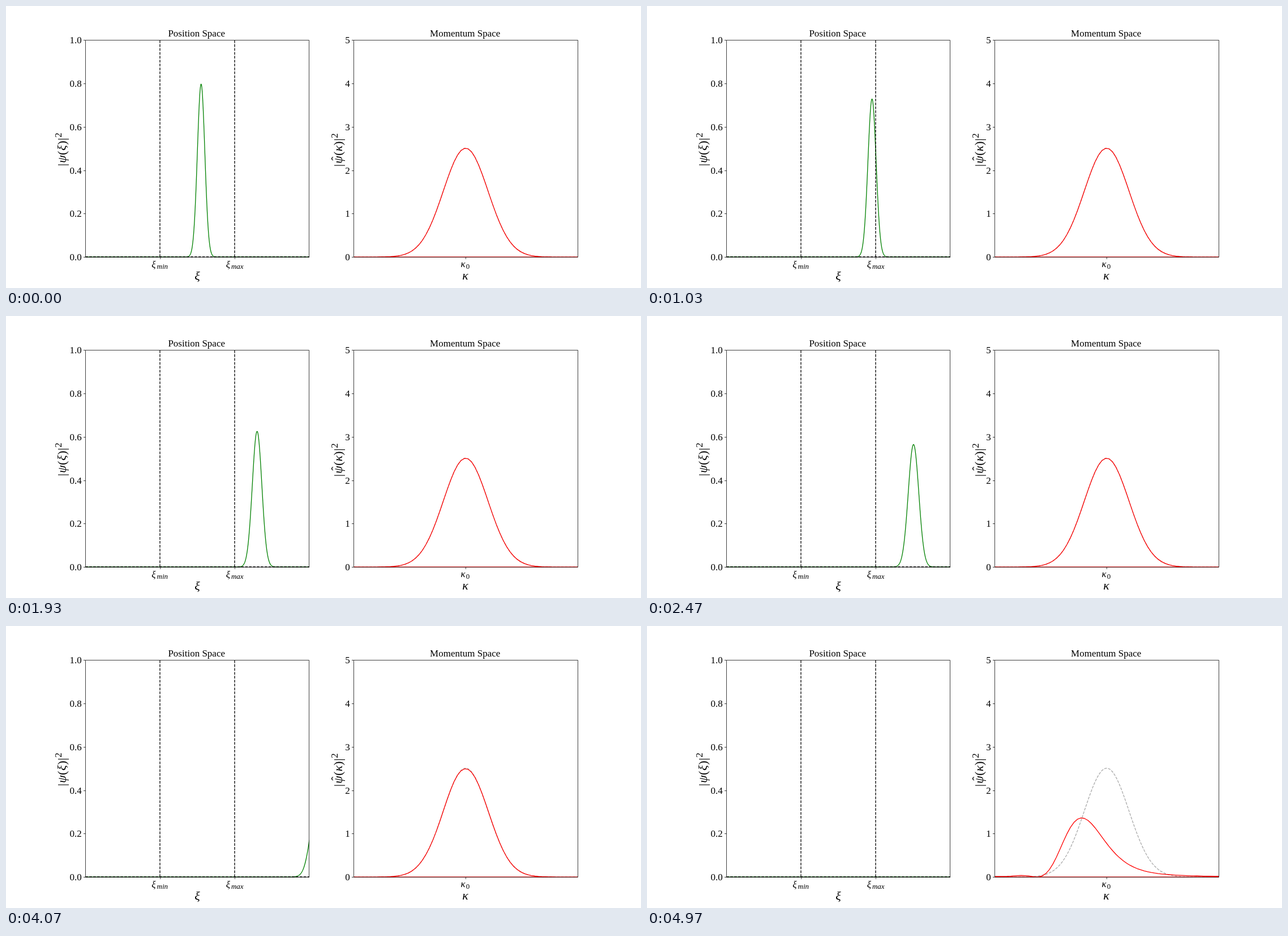
Recreate the animation shown at these times as an HTML page. Size 1122 by 499 pixels, loop 5000 ms.

```html
<!DOCTYPE html>
<html lang="en">
<head>
<meta charset="utf-8">
<title>Wave packet in position and momentum space</title>
<style>
html, body { margin: 0; width: 100%; height: 100%; overflow: hidden; background: #fff; }
svg { display: block; width: 1122px; height: 499px; }
text { font-family: "Liberation Serif", "Noto Serif", serif; font-size: 17px; text-anchor: middle; }
.end { text-anchor: end; }
.it { font-style: italic; }
.big { font-size: 22px; }
.sub { font-size: 13px; }
path { fill: none; stroke-width: 1.3; stroke-linejoin: round; }
.dash { stroke-dasharray: 4.805 2.078; }
.frame { stroke: #000; stroke-width: .75; }
</style>
</head>
<body>
<svg id="stage" viewBox="0 0 1122 499">
  <clipPath id="clipL"><rect x="140.25" y="60" width="395.75" height="385"/></clipPath>
  <clipPath id="clipR"><rect x="614.6" y="60" width="395.5" height="385"/></clipPath>
  <g clip-path="url(#clipL)">
    <path id="pos" stroke="#008000"/>
    <path class="dash" stroke="#000" d="M140.25 444H536M272 444.1V60M404 444.1V60"/>
  </g>
  <g clip-path="url(#clipR)">
    <path id="ref" class="dash" stroke="#a9a9a9"/>
    <path id="mom" stroke="#f00"/>
  </g>
</svg>
<script>
const $ = id => document.getElementById(id);
const BASE = 444.15, HEIGHT = 384.1;
const XI0 = 337.9, XI = 13.175;        // position axis: centre and pixels per unit
const K0 = 812.2, K = 39.525;          // momentum axis: centre and pixels per unit
const EDGE = 19.975;                   // end of the computed domain
const DK = 2 * Math.PI / 40, PHASE = -0.32;

const add = (tag, attrs, content = '') => {
  const el = document.createElementNS('http://www.w3.org/2000/svg', tag);
  for (const a in attrs) el.setAttribute(a, attrs[a]);
  el.textContent = content;
  $('stage').append(el);
};
const label = (x, y, s, cls = '') => add('text', { x, y, class: cls }, s);
const polyline = pts => 'M' + pts.map(p => p[0].toFixed(2) + ' ' + p[1].toFixed(2)).join('L');

// Axes, ticks and labels
function axes(left, right, title, step, digits) {
  let d = `M${left} 60.5H${right}V444.5H${left}Z`;
  for (let v = 0; v <= 5; v++) {
    const y = BASE - v * HEIGHT / 5;
    d += `M${left} ${Math.floor(y + .5) + .5}h-3.5`;
    label(left - 6.7, y + 6, (v * step).toFixed(digits), 'end');
  }
  add('path', { class: 'frame', d });
  label((left + right) / 2 - 1.3, 54.3, title);
}
axes(140.5, 535.5, 'Position Space', .2, 1);
axes(614.5, 1010.5, 'Momentum Space', 1, 0);
add('path', { class: 'frame', d: 'M272.5 444.5v3.5M404.5 444.5v3.5M812.5 444.5v3.5' });

label(261, 463, 'ξ', 'it');
label(276.3, 465.3, 'min', 'it sub');
label(392.5, 463, 'ξ', 'it');
label(408.8, 465.3, 'max', 'it sub');
label(807.5, 462, 'κ', 'it');
label(816, 464.5, '0', 'sub');
label(338, 484.5, 'ξ', 'it big');
label(811.5, 484, 'κ', 'it big');

// Vertical labels, one glyph at a time along the reading direction
function sideLabel(x, bottom, greek, hat) {
  const glyph = (at, s, cls, lift = 0) =>
    add('text', { transform: `translate(${x - lift} ${bottom - at}) rotate(-90)`, class: cls }, s);
  glyph(2, '|', 'big');
  glyph(12, 'ψ', 'it big');
  if (hat) glyph(14, 'ˆ', 'big', 4);
  glyph(23, '(', 'big');
  glyph(32, greek, 'it big');
  glyph(41, ')', 'big');
  glyph(47.5, '|', 'big');
  glyph(54.5, '2', '', 8);
}
sideLabel(106, 283, 'ξ', false);
sideLabel(593.5, 284, 'κ', true);

// Momentum density of the spreading packet, cut off b units past its centre
function spectrum(tau, b) {
  const N = 320, low = -8, h = (Math.min(b, 8) - low) / N, w = 1 + tau * tau;
  const psi = Array.from({ length: N }, (_, i) => {
    const u = low + (i + .5) * h;
    return [u, Math.exp(-u * u / w), u * u * tau / w];
  });
  const norm = Math.sqrt(2 * Math.PI) * h * h / (Math.PI * Math.sqrt(w));
  return q => {
    let re = 0, im = 0;
    for (const [u, a, p] of psi) {
      re += a * Math.cos(p - q * u);
      im += a * Math.sin(p - q * u);
    }
    return norm * (re * re + im * im);
  };
}

const ref = [];
for (let q = -5; q <= 5.001; q += .05)
  ref.push([K0 + q * K, BASE - Math.sqrt(2 * Math.PI) * Math.exp(-q * q / 2) * HEIGHT / 5]);
$('ref').setAttribute('d', polyline(ref));

function draw(step) {
  const n = step + 4, centre = .12945 * n, tau = .0128 * n;
  const spread = 1 + tau * tau, peak = Math.sqrt(2 / Math.PI / spread);

  const pos = [];
  for (let x = 140; x <= 536; x += .5) {
    const u = (x - XI0) / XI - centre;
    pos.push([x, BASE - HEIGHT * peak * Math.exp(-2 * u * u / spread)]);
  }
  $('pos').setAttribute('d', polyline(pos));

  const density = spectrum(tau, EDGE - centre), mom = [];
  for (let m = -33; m <= 34; m++) {
    const q = (m + PHASE) * DK;
    mom.push([K0 + q * K, BASE - density(q) * HEIGHT / 5]);
  }
  $('mom').setAttribute('d', polyline(mom) + `M614 ${BASE}H1011`);
}

let shown = -1;
function tick() {
  const t = performance.now() % 5000;
  const step = Math.min(149, Math.floor((t + 3.4) * .03));
  if (step !== shown) draw(shown = step);
  requestAnimationFrame(tick);
}
tick();
</script>
</body>
</html>
```
